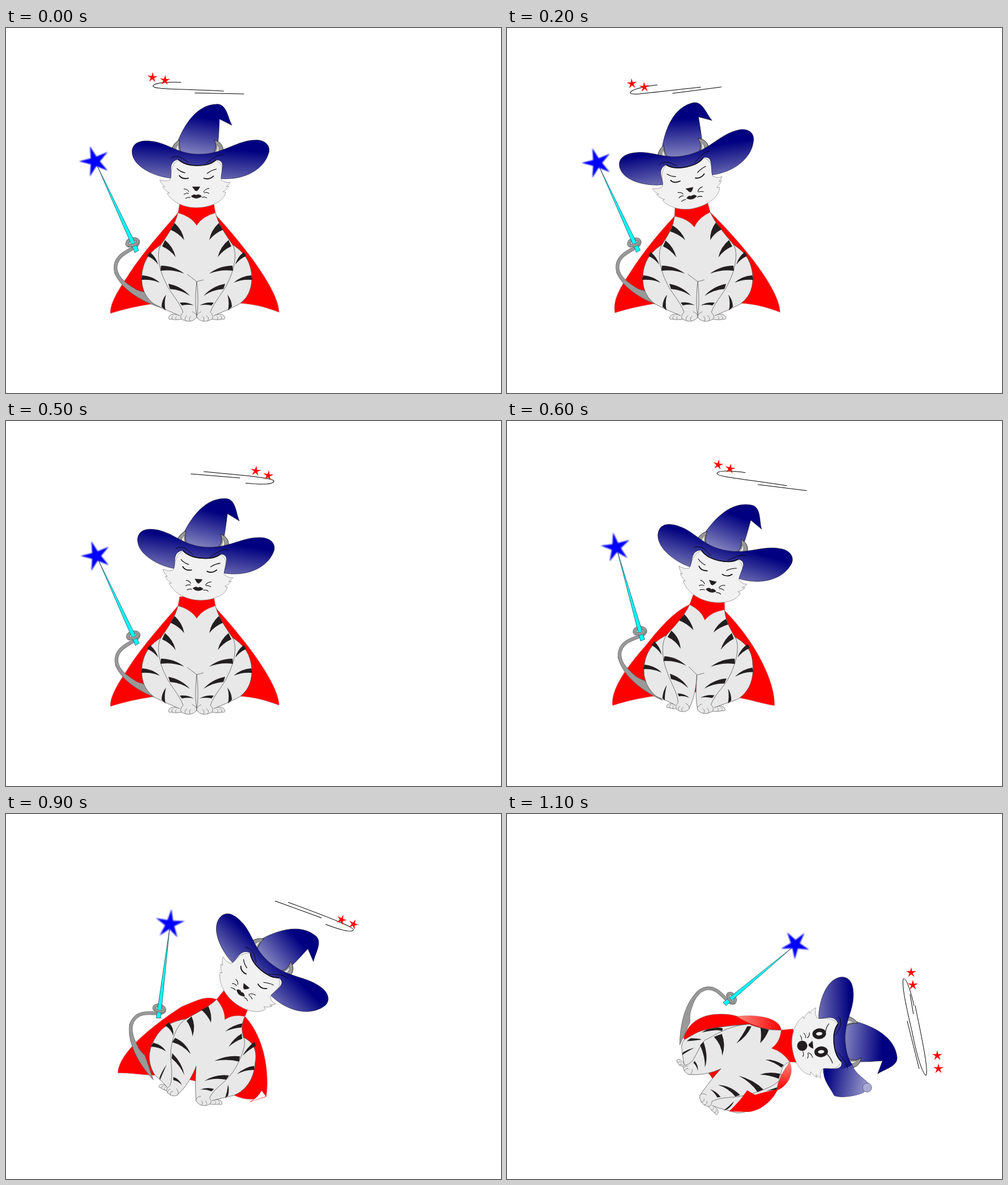
These frames come from a looping animation (872x642 px, 1.3 s). An HTML page:

```html
<!DOCTYPE html>
<html lang="en">
<head>
<meta charset="utf-8">
<title>Dizzy wizard cat</title>
<style>
html, body { margin: 0; width: 100%; height: 100%; overflow: hidden; background: #fff; }
svg { display: block; width: 872px; height: 642px; }
</style>
</head>
<body>
<svg id="stage" viewBox="0 0 872 642"></svg>
<script>
const LOOP = 1300;
const INK = '#231f20', FUR = '#e8e8e8', GREY = '#999';

// stance: 0 leaning left, 1 upright, 2 tilting, 3 toppling, 4 fallen
const keys = [
  { at: 0, stance: 1, head: [335, 282, 0], tail: [223, 378, 0, 1], ring: ['left', 259, 102, 4.1], stars: [258, 87, 280, 92] },
  { at: 100, stance: .5, head: [328, 283, -6], tail: [224, 378, 0, .98], ring: ['left', 238, 108, 0], stars: [239, 93, 261, 98] },
  { at: 200, stance: 0, head: [322, 284, -11.8], tail: [224, 378, 0, .98], ring: ['left', 217, 114, -4.6], stars: [220, 98, 242, 104] },
  { at: 300, stance: 1, head: [335, 283, -3.9], tail: [224, 378, 0, .98], ring: ['right', 430, 92, -4.1], stars: [399, 84, 430, 79] },
  { at: 400, stance: 1, head: [337, 282, .5], tail: [224, 378, 0, .98], ring: ['right', 451, 99, 2], stars: [420, 86, 446, 87] },
  { at: 500, stance: 1, head: [339, 281, 4.8], tail: [224, 378, 0, .98], ring: ['right', 472, 106, 7.8], stars: [440, 88, 462, 96] },
  { at: 600, stance: 1.5, head: [362, 284, 13], tail: [234, 370, 9, .97], ring: ['left', 370, 92, 10], stars: [372, 77, 393, 84] },
  { at: 800, stance: 2, head: [388, 287, 23], tail: [244, 362, 18.5, .96], ring: ['right', 555, 151, 13.4], stars: [532, 138, 555, 140] },
  { at: 900, stance: 2.5, head: [422, 304, 40], tail: [270, 343, 32, .95], ring: ['right', 612, 204, 23], stars: [591, 186, 612, 194] },
  { at: 1000, stance: 3, head: [459, 324, 57], tail: [297, 326, 46, .93], ring: ['right', 669, 264, 32.5], stars: [650, 238, 668, 252] },
  { at: 1100, stance: 4, head: [536, 406, 84], tail: [395, 324, 75, .93], ring: ['loop', 0, 0, 0], stars: [712, 279, 715, 301, 758, 425, 760, 448] }
];

// Body joints per stance: shoulder, chest, crotch, elbow, thigh, paw, foot,
// first stripe tip, knee, arm, rump, hip; then the neck corner.
const JOINTS = 24;
const uprightLeft = [303,325, 336,347, 336,446, 272,382, 238,440, 323,507, 292,509, 314,373, 287,454, 270,405, 265,487, 251,398, 306,309];
const flip = list => list.map((n, i) => i % 2 ? n : 672 - n);
const uprightRight = flip(uprightLeft);
const joints = [
  { left: [295,331, 330,350, ...uprightLeft.slice(4, JOINTS), 296,316],
    right: [358,324, 330,350, ...uprightRight.slice(4, JOINTS), 353,305] },
  { left: uprightLeft, right: uprightRight },
  { left: [340,321, 361,353, 333,447, 288,373, 242,427, 293,499, 281,494, 343,363, 288,443, 281,397, 267,484, 263,385, 350,302],
    right: [398,339, 361,353, 333,447, 405,380, 434,437, 347,505, 378,504, 369,371, 386,460, 406,405, 400,493, 431,394, 400,321] },
  { left: [402,331, 410,370, 337,440, 345,348, 270,386, 290,474, 268,465, 379,371, 296,405, 322,364, 262,438, 303,355, 419,317],
    right: [444,373, 410,370, 337,440, 433,408, 442,458, 347,505, 374,511, 403,394, 396,467, 428,425, 397,497, 447,414, 452,366] },
  { left: [483,380, 466,412, 377,448, 425,369, 318,398, 319,446, 303,436, 446,403, 343,402, 398,371, 308,412, 344,384, 504,378],
    right: [498,436, 466,412, 377,448, 482,467, 437,508, 349,503, 368,524, 455,432, 407,496, 468,482, 395,522, 477,482, 512,437] }
];

const capes = [
  'M295 331 C270 358 240 393 217 430 C195 463 187 480 190 501 C215 493 240 488 265 484 C320 478 370 478 412 484 C440 486 460 492 481 500 C481 470 440 405 358 324Z',
  'M303 325 C280 352 240 395 212 440 C190 472 183 490 184 502 C215 492 240 488 265 484 C320 478 370 478 412 484 C440 486 460 492 481 500 C481 470 440 405 366 325Z',
  'M340 321 C310 317 300 330 280 346 C230 395 182 455 188 499 C215 490 245 484 265 482 C300 470 340 470 400 489 C420 494 440 503 461 501 C466 465 450 385 398 339Z',
  'M402 331 C395 320 370 327 340 331 C300 340 215 380 206 412 C225 420 240 435 262 437 C300 455 340 462 397 497 C411 510 430 508 456 493 C462 450 464 405 444 373Z'
];
const flaps = ['M454 496 L461 501 L449 505 Q452 502 454 496Z', 'M446 476 L456 493 L411 507 Q438 494 446 476Z'];

const bodyFill = 'M336 347 C328 335 318 330 303 325 C298 345 286 362 273 381 C256 392 244 405 240 428 C236 455 245 475 262 486 C275 493 292 500 306 506 L322 514 L335 510 C340 490 338 465 336 446 L352 440 L352 360Z';
const bodyLines = 'M303 325 C298 345 286 362 273 381 C256 392 244 405 240 428 C236 455 245 475 262 486 C275 493 292 500 306 506 M273 381 C264 395 270 425 280 445 C288 465 305 480 312 500 M335 510 C340 490 338 465 336 446';
const feet = [
  'M306 505 C298 503 290 502 287 508 C285 512 288 513 292 512 C297 514 304 513 310 512 M293 512 C291 509 293 507 295 506 M300 513 C298 510 299 508 301 507',
  'M312 500 C305 507 307 513 314 514 C318 517 332 517 336 508 C336 503 331 500 328 499 M317 515 C314 511 316 508 319 506 M325 516 C322 512 323 509 326 507'
];
// Each stripe: upper edge, lower edge, tip
const stripes = [
  [297,343, 290,355, 314,373], [280,373, 275,384, 299,403], [253,394, 249,401, 268,416], [273,418, 272,427, 314,432],
  [240,435, 238,443, 271,448], [286,450, 289,459, 324,471], [306,483, 310,488, 331,488], [274,490, 281,497, 282,469]
];

const mix = (a, b, k) => a + (b - a) * k;
const round = n => Math.round(n * 100) / 100;
const draw = (d, fill, stroke = 'none', width = .7) =>
  `<path d="${d}" fill="${fill}" stroke="${stroke}" stroke-width="${width}"/>`;
const line = (d, width = .8, color = '#000') => draw(d, 'none', color, width);

function blend(list, at, fn) {
  const i = Math.min(Math.floor(at), list.length - 1);
  const j = Math.min(i + 1, list.length - 1);
  return fn(list[i], list[j], at - i);
}
const mixLists = (a, b, k) => a.map((n, i) => mix(n, b[i], k));
function mixPaths(a, b, k) {
  const goal = b.match(/[\d.]+/g);
  let i = 0;
  return a.replace(/[\d.]+/g, n => round(mix(+n, +goal[i++], k)));
}

function star(x, y, r, inner, turn = 0) {
  const points = Array.from({ length: 10 }, (_, i) => {
    const a = (i * 36 - 90 + turn) * Math.PI / 180, d = i % 2 ? r * inner : r;
    return round(x + d * Math.cos(a)) + ' ' + round(y + d * Math.sin(a));
  });
  return 'M' + points.join('L') + 'Z';
}

// Moving least squares: bends a point along with the joints around it.
function warp(x, y, from, to) {
  let sum = 0, px = 0, py = 0, qx = 0, qy = 0;
  const weights = [];
  for (let i = 0; i < JOINTS; i += 2) {
    const w = 1 / ((from[i] - x) ** 2 + (from[i + 1] - y) ** 2 + .01);
    weights.push(w);
    sum += w;
    px += w * from[i]; py += w * from[i + 1];
    qx += w * to[i]; qy += w * to[i + 1];
  }
  px /= sum; py /= sum; qx /= sum; qy /= sum;
  let a = 0, b = 0, m = 0;
  weights.forEach((w, n) => {
    const i = n * 2, ux = from[i] - px, uy = from[i + 1] - py, vx = to[i] - qx, vy = to[i + 1] - qy;
    a += w * (ux * vx + uy * vy);
    b += w * (ux * vy - uy * vx);
    m += w * (ux * ux + uy * uy);
  });
  const dx = x - px, dy = y - py;
  return [round(qx + (a * dx - b * dy) / m), round(qy + (b * dx + a * dy) / m)];
}

function stripePath([ax, ay, bx, by, tx, ty]) {
  const bow = (x, y, k) => `${mix(x, tx, .5) + (ty - y) * k} ${mix(y, ty, .5) - (tx - x) * k}`;
  return `M${ax} ${ay} Q${bow(ax, ay, .17)} ${tx} ${ty} Q${bow(bx, by, .13)} ${bx} ${by}Z`;
}

function body(stance, left, right) {
  const bend = (d, mirrored) => d.replace(/(-?[\d.]+) (-?[\d.]+)/g, (_, x, y) =>
    (mirrored ? warp(672 - x, +y, uprightRight, right) : warp(+x, +y, uprightLeft, left)).join(' '));
  const both = fn => [false, true].map(fn).join('');
  return both(m => draw(bend(feet[0], m), FUR, '#555')) +
    both(m => draw(bend(bodyFill, m), FUR)) +
    both(m => line(bend(bodyLines, m), .7, '#444') +
      stripes.map(s => draw(bend(stripePath(s), m), INK)).join('') +
      draw(bend(feet[1], m), FUR, '#555')) +
    (stance < 2 ? line(bend('M336 446 L319 433', false) + bend('M336 446 L324 443', true), .7, '#444') : '');
}

function collar(left, right) {
  const [ax, ay, tx, ty] = left, [bx, by] = right;
  const [nx, ny] = left.slice(JOINTS), [mx, my] = right.slice(JOINTS);
  const cx = (ax + bx + nx + mx) / 4, cy = (ay + by + ny + my) / 4;
  const curve = (x, y) => `${.3 * x + .4 * tx + .3 * cx} ${.3 * y + .4 * ty + .3 * cy}`;
  return draw(`M${nx} ${ny} L${mx} ${my} L${bx} ${by} Q${curve(bx, by)} ${tx} ${ty} Q${curve(ax, ay)} ${ax} ${ay}Z`, 'red', '#a66', .5);
}

function capeBack(stance) {
  if (stance === 4)
    return draw('M311 394 C320 365 345 352 375 352 C392 352 400 354 409 357 L483 380 L450 400 L375 440 L381 458 L364 468 L349 447 L330 420Z', 'red', '#844', .6) +
      draw('M405 356 C440 352 482 358 483 381 C460 380 430 372 405 356Z', 'url(#fadeX)', '#a66', .5);
  const flap = stance < 2 ? '' : draw(blend(flaps, stance - 2, mixPaths), '#fff', 'red', .6);
  return draw(blend(capes, stance, mixPaths), 'red', '#c77', .7) + flap;
}
const capeFront = () =>
  draw('M498 436 C508 460 490 482 475 486 C478 465 485 455 498 436Z', 'url(#fadeY)', '#a66', .5) +
  draw('M391 523 C405 510 415 498 423 486 L437 494 C455 488 470 486 477 484 C468 505 445 523 425 524Z', 'red');

function tailAndWand([x, y, turn, scale]) {
  const curve = 'M218 383 C211 383 212 374 222 372 C231 370 235 375 231 381 C222 392 191 397 193 424 C195 443 215 455 235 467';
  const grip = 'M216 382 C224 384 233 379 232 374';
  // The star lags a little behind the swing of the wand.
  const starTurn = -18 - turn / 4;
  return `<g transform="translate(${x} ${y}) rotate(${turn}) scale(${scale}) translate(-223 -378)">` +
    line(curve, 6.4, '#555') +
    draw('M191 430 C202 450 226 461 246 465 L283 495 C250 486 205 465 191 430Z', GREY, '#555') +
    line(curve, 5.2, GREY) +
    draw('M161 243 L234 391 L227 395Z', 'cyan', '#234', .7) +
    line(grip, 5.4, '#555') + line(grip, 4.2, GREY) +
    `<g filter="url(#soft)">${draw(star(156.5, 234.5, 28, .32, starTurn), 'blue')}</g></g>`;
}

const closedFace =
  line('M305 259 Q310 267 322 264 M348 264 Q358 268 366 260', 1.7) +
  draw('M326 296 C330 292 333 292 335 294 C338 292 341 292 345 296 C338 301 332 301 326 296Z', INK);
const openFace = [317, 349].map(x =>
  `<ellipse cx="${x}" cy="266" rx="9.5" ry="12" fill="${INK}"/><ellipse cx="${x}" cy="266" rx="3" ry="5.5" fill="#fff"/>`).join('') +
  `<circle cx="335" cy="298" r="9" fill="${INK}"/>`;

function head([x, y, turn], fallen) {
  const crushed = 'C392 212 402 197 414 188 L428 199 C433 215 434 240 428 251 C412 257 400 268 379 265';
  const brimRight = fallen
    ? 'C358 222 368 219 377 214 ' + crushed
    : 'C385 222 405 197 442 197 C460 198 467 210 462 222 C455 245 425 268 379 265';
  const brim = 'M290 264 C265 262 222 245 222 217 C223 200 240 196 262 200 C288 205 305 222 340 222 ' + brimRight +
    ' C379 250 388 232 370 232 C360 240 350 242 337 242 C320 242 312 238 303 231 C284 236 293 255 290 264Z';
  const crushedBrim = fallen
    ? draw(`M377 214 ${crushed} C379 250 388 232 377 214Z`, 'url(#crushed)') +
      '<circle cx="420" cy="192" r="8" fill="#aaaad2" stroke="#447" stroke-width=".7"/>'
    : '';
  return `<g transform="translate(${x} ${y}) rotate(${turn}) translate(-335 -282)">` +
    draw('M302 201 C315 168 337 134 373 134 C389 135 391 159 398 171 L376 160 C375 180 375 195 371 218 C355 226 320 226 302 218Z', 'url(#cone)', '#113', .7) +
    draw('M291 214 C295 205 300 199 306 197 C304 205 306 215 311 223 L291 220Z', GREY, '#222', .9) +
    draw('M299 218 C299 210 302 206 304 204 C303 210 305 215 307 221Z', FUR, '#444', .5) +
    draw('M383 217 C382 205 377 200 367 197 C371 205 371 213 364 222 L383 220Z', GREY, '#222', .9) +
    draw('M375 218 C376 211 374 207 371 205 C373 211 371 216 367 221Z', FUR, '#444', .5) +
    draw('M302 233 C290 240 292 255 289 267 C283 270 277 269 271 267 C273 273 276 276 280 279 L276 279 C279 284 283 288 288 290 L284 291 C292 305 312 316 335 316 C360 316 384 305 387 289 L382 288 C388 285 391 281 393 278 L388 279 C392 276 394 273 395 271 C390 273 384 271 379 267 C381 255 384 240 372 234 C350 226 320 226 302 233Z', '#f1f1f2', '#888', .7) +
    draw(brim, 'url(#brim)', '#113', .6) + crushedBrim +
    line('M303 231 Q314 242 337 242 Q360 242 370 232', 1.5) +
    line('M290 229 C305 221 312 231 322 237 M383 223 C370 222 362 232 352 238') +
    line('M301 247 Q307 253 316 255 M354 256 Q362 250 371 248', 1.1) +
    draw('M328 279 L342 279 Q340 284 336 287 L333 286Z', INK) +
    line('M313 283 Q320 283 322 288 M313 293 Q318 289 322 291 M316 300 Q320 297 325 298 M358 282 Q350 283 348 289 M358 291 Q352 288 349 290 M354 299 Q350 296 345 298', 1) +
    (fallen ? openFace : closedFace) + '</g>';
}

const rings = {
  left: 'M49 -10 C20 -9 1 -5 0 0 C0 6 40 2 125 0 M74 7 L161 2.6',
  right: 'M-125 0 C-40 -4 0 -5 0 0 C-1 6 -20 9 -49 10 M-147 7 L-60 2.3',
  loop: 'M717 337 C711 310 703 287 698 290 C695 305 706 350 714 385 C723 430 732 456 738 460 C743 452 732 400 719 337 M710 317 L716 352 M705 364 L726 448'
};
function dizziness([side, x, y, turn], spots) {
  let out = `<g transform="translate(${x} ${y}) rotate(${turn})">${line(rings[side], 1)}</g>`;
  for (let i = 0; i < spots.length; i += 2) out += draw(star(spots[i], spots[i + 1], 9.5, .32, turn), 'red');
  return out;
}

function gradient(id, x1, y1, x2, y2, ...colors) {
  const stops = colors.map((c, i) => `<stop offset="${i / (colors.length - 1)}" stop-color="${c}"/>`).join('');
  return `<linearGradient id="${id}" gradientUnits="userSpaceOnUse" x1="${x1}" y1="${y1}" x2="${x2}" y2="${y2}">${stops}</linearGradient>`;
}
const defs = '<defs>' +
  gradient('cone', 352, 158, 340, 228, '#000080', '#8989c2') +
  gradient('brim', 340, 210, 336, 272, '#000080', '#7676b6') +
  gradient('crushed', 390, 262, 412, 190, '#000080', '#9a9acb') +
  gradient('fadeX', 405, 0, 483, 0, '#ff8a80', 'red') +
  gradient('fadeY', 0, 436, 0, 486, '#ff8a80', 'red') +
  '<filter id="soft" x="-30%" y="-30%" width="160%" height="160%"><feGaussianBlur stdDeviation="1.1"/></filter></defs>';

function scene({ stance, head: pose, tail, ring, stars }) {
  const { left, right } = blend(joints, stance, (a, b, k) =>
    ({ left: mixLists(a.left, b.left, k), right: mixLists(a.right, b.right, k) }));
  const fallen = stance === 4;
  return defs + capeBack(stance) + tailAndWand(tail) + body(stance, left, right) +
    (fallen ? capeFront() : '') + collar(left, right) + head(pose, fallen) + dizziness(ring, stars);
}

const stage = document.getElementById('stage');
const start = performance.now();
let shown;
function tick() {
  const time = (performance.now() - start) % LOOP;
  const key = keys.findLast(k => k.at <= time);
  if (key !== shown) stage.innerHTML = scene(shown = key);
  requestAnimationFrame(tick);
}
tick();
</script>
</body>
</html>
```
